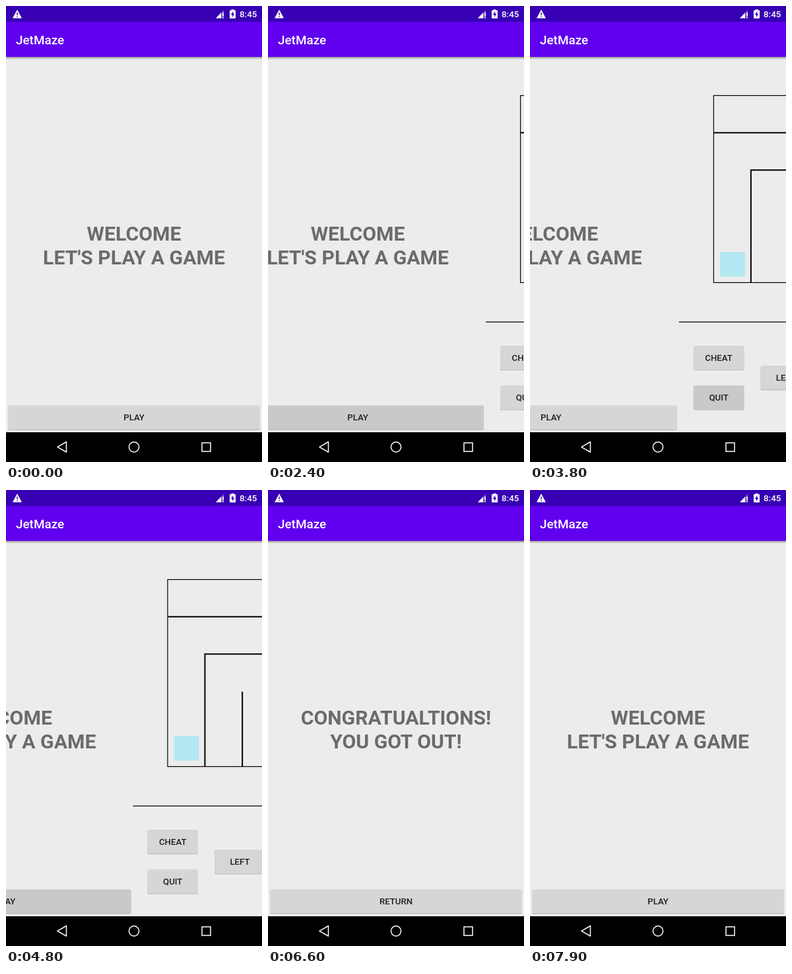
Write an HTML page that moves like this. It is 388 px wide and 690 px high and loops after 8 s.

```html
<!DOCTYPE html>
<html lang="en">
<head>
<meta charset="utf-8">
<title>JetMaze</title>
<style>
html, body { margin: 0; width: 100%; height: 100%; overflow: hidden; background: #ececec; }
svg { display: block; width: 388px; height: 690px; font-family: Roboto, sans-serif; font-weight: 500; }
.button rect { fill: #d6d6d6; }
.button .shade { fill: #bdbdbd; }
.button .press { fill: #000; opacity: 0; }
.button text { font-size: 13.2px; fill: #1f1f1f; text-anchor: middle; }
.headline { font-size: 30.2px; font-weight: 700; fill: #6b6b6b; text-anchor: middle; }
.line { fill: none; stroke: #000; }
.bar { fill: #fff; }
</style>
</head>
<body>
<svg viewBox="0 0 388 690">
  <defs>
    <linearGradient id="shadow" x2="0" y2="1">
      <stop stop-color="#999"/>
      <stop offset="1" stop-color="#ececec"/>
    </linearGradient>
  </defs>
  <rect width="388" height="690" fill="#ececec"/>

  <g id="welcome">
    <g class="headline">
      <text x="194" y="355">WELCOME</text>
      <text x="194" y="390.5">LET'S PLAY A GAME</text>
    </g>
  </g>

  <g id="maze">
    <rect class="line" x="52.5" y="135.5" width="283" height="283" stroke-width="1.2"/>
    <path class="line" stroke-width="2" d="M53 191.7H222.5M109 418V248.3H222.5V362M165.7 418V305.3M279 136V305.3M279 362H335"/>
    <rect x="289" y="145" width="37.5" height="37.5" fill="#99cc00"/>
    <rect x="62" y="372" width="38" height="37.5" fill="#b5e8f2"/>
    <path class="line" stroke-width="1.3" d="M0 478.2H388"/>
  </g>

  <g id="won">
    <g class="headline">
      <text x="194" y="355">CONGRATUALTIONS!</text>
      <text x="194" y="390.5">YOU GOT OUT!</text>
    </g>
  </g>

  <!-- app bar -->
  <rect y="77" width="388" height="4" fill="url(#shadow)"/>
  <rect y="24" width="388" height="53" fill="#6000ee"/>
  <text class="bar" x="15" y="57.5" font-size="18.9">JetMaze</text>

  <!-- status bar -->
  <rect width="388" height="24" fill="#3700b3"/>
  <path class="bar" d="M17 5.5L24 18.5H10Z"/>
  <path d="M17 10V14M17 15.3V16.7" stroke="#3700b3" stroke-width="1.4"/>
  <path class="bar" opacity=".35" d="M330 6V18.5H318Z"/>
  <path class="bar" d="M326 10.2V18.5H318ZM328.4 10H330V15.5H328.4ZM328.4 17H330V18.5H328.4Z"/>
  <path class="bar" d="M341.5 5.2H345.5V6.5H348V18.7H339V6.5H341.5Z"/>
  <path fill="#3700b3" d="M344.3 8L340.8 13.3H343V17L346.3 11.7H344.3Z"/>
  <text class="bar" x="354" y="17" font-size="13.4">8:45</text>

  <!-- navigation bar -->
  <rect y="645" width="388" height="45"/>
  <g fill="none" stroke="#fff" stroke-width="1.5">
    <path d="M78 667.3L91.5 659.5V675Z" stroke-linejoin="round"/>
    <circle cx="194" cy="667.3" r="7.6"/>
    <rect x="297" y="661" width="13" height="13"/>
  </g>
</svg>
<script>
const WIDTH = 388, LOOP = 8000, SLIDE = 400;
const $ = id => document.getElementById(id);
const screens = ['welcome', 'maze', 'won'].map($);
const presses = {};

function addButton(screen, label, x, y, w = 76.5) {
  const rect = (cls, dy) =>
    `<rect class="${cls}" x="${x}" y="${y + dy}" width="${w}" height="36" rx="2"/>`;
  $(screen).insertAdjacentHTML('beforeend',
    `<g class="button">${rect('shade', 1.2)}${rect('', 0)}${rect('press', 0)}
     <text x="${x + w / 2}" y="${y + 22.7}">${label}</text></g>`);
  presses[label] = $(screen).lastElementChild.querySelector('.press');
}

addButton('welcome', 'PLAY', 3, 604.5, 382);
addButton('won', 'RETURN', 3, 604.5, 382);
addButton('maze', 'CHEAT', 22, 514);
addButton('maze', 'QUIT', 22, 574.3);
addButton('maze', 'UP', 209, 499);
addButton('maze', 'LEFT', 123.7, 544.3);
addButton('maze', 'UNDO', 207, 544.3);
addButton('maze', 'RIGHT', 290, 544.3);
addButton('maze', 'DOWN', 209, 589.5);

// Each tap starts a press, then a slide; dir 1 moves content to the left.
const taps = [
  { label: 'PLAY', press: 1900, slide: 2300, from: 0, to: 1, dir: 1 },
  { label: 'QUIT', press: 3220, slide: 3580, from: 1, to: 0, dir: -1 },
  { label: 'PLAY', press: 4270, slide: 4600, from: 0, to: 1, dir: 1 },
  { label: 'CHEAT', press: 5260, slide: 5612, from: 1, to: 2, dir: 1 },
  { label: 'RETURN', press: 6760, slide: 7090, from: 2, to: 0, dir: -1 }
];

const clamp = v => Math.max(0, Math.min(1, v));
const ease = p => (1 - Math.cos(Math.PI * p)) / 2;

function place(index, x) {
  screens[index].style.display = '';
  screens[index].setAttribute('transform', `translate(${x})`);
}

function draw(t) {
  for (const s of screens) s.style.display = 'none';
  for (const p of Object.values(presses)) p.style.opacity = 0;

  const tap = taps.findLast(s => t >= s.slide);
  const p = tap ? ease(clamp((t - tap.slide) / SLIDE)) : 1;
  if (p < 1) place(tap.from, -tap.dir * p * WIDTH);
  place(tap ? tap.to : 0, tap ? tap.dir * (1 - p) * WIDTH : 0);

  for (const { label, press } of taps) {
    const age = t - press;
    if (age < 0 || age > 900) continue;
    const style = presses[label].style;
    style.opacity = 0.06 * clamp(age / 80) * clamp((900 - age) / 300);
    style.clipPath = `circle(${age * 0.8}px)`;
  }
}

const start = performance.now();
function frame() {
  draw((performance.now() - start) % LOOP);
  requestAnimationFrame(frame);
}
frame();
</script>
</body>
</html>
```
